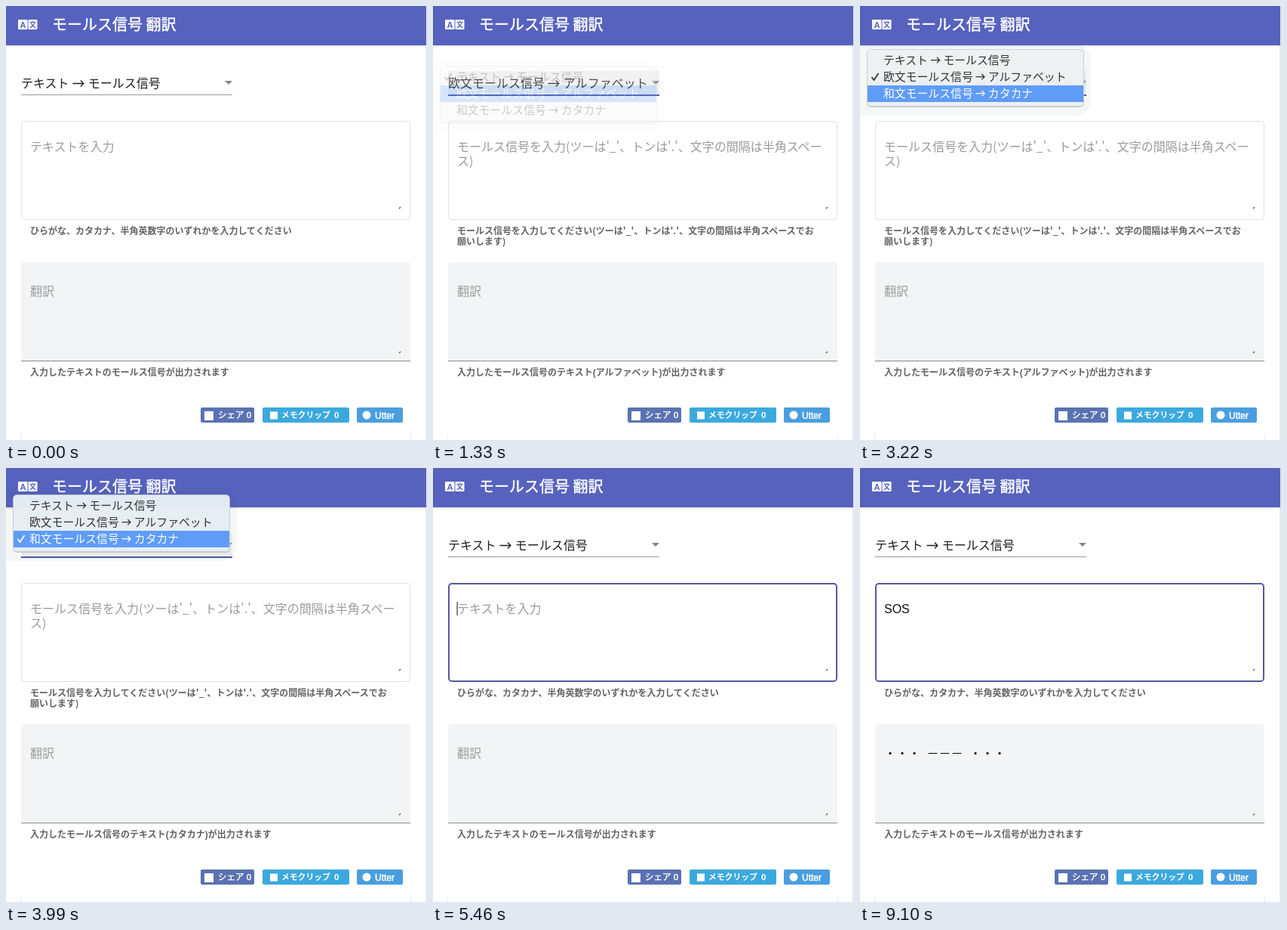
An HTML page for the animation above (9170 ms loop, 558 by 574 pixels).

```html
<!DOCTYPE html>
<html lang="ja">
<head>
<meta charset="utf-8">
<title>モールス信号 翻訳</title>
<style>
  html, body { margin: 0; width: 100%; height: 100%; overflow: hidden; background: #fff; }
  svg { display: block; width: 558px; height: 574px; }
  text { font-family: "Liberation Sans", "Noto Sans CJK JP", "Noto Sans CJK", sans-serif; white-space: pre; }
  .cjk text { font-family: "Noto Sans CJK JP", "Noto Sans CJK", sans-serif; }
</style>
</head>
<body>
<svg id="stage" viewBox="0 0 558 574" xmlns="http://www.w3.org/2000/svg"></svg>
<script>
const LOOP = 9170, STEP = 70;
const PRIMARY = '#5662bd', FOCUS = '#5658a2', MUTED = '#9b9b9b', HINT = '#646464';
const stage = document.getElementById('stage');

const MODES = [
  { head: 'テキスト', tail: 'モールス信号', result: '入力したテキストのモールス信号が出力されます' },
  { head: '欧文モールス信号', tail: 'アルファベット', result: '入力したモールス信号のテキスト(アルファベット)が出力されます' },
  { head: '和文モールス信号', tail: 'カタカナ', result: '入力したモールス信号のテキスト(カタカナ)が出力されます' }
];
const TEXT_PROMPT = ['テキストを入力'];
const MORSE_PROMPT = ["モールス信号を入力(ツーは'_'、トンは'.'、文字の間隔は半角スペー", 'ス)'];
const TEXT_HINT = ['ひらがな、カタカナ、半角英数字のいずれかを入力してください'];
const MORSE_HINT = ["モールス信号を入力してください(ツーは'_'、トンは'.'、文字の間隔は半角スペースでお", '願いします)'];

// hover: [time, row]
const MENUS = [
  { open: 140, pick: 1050, close: 1400, from: 0, hover: [[140, 0], [560, 1]] },
  { open: 2170, pick: 3150, close: 3570, from: 1, hover: [[2170, 1], [2660, 2]] },
  { open: 3780, pick: 4760, close: 5040, from: 2, hover: [[3780, 2], [4340, 1], [4620, 0]] }
];
const MODE_STEPS = [[0, 0], [1260, 1], [3360, 2], [4900, 0]];
const INPUT_STEPS = [[0, ''], [5950, 'S'], [7000, 'SO'], [7280, 'SOS']];
const OUTPUT_STEPS = [[0, []], [6440, ['・・・']], [7770, ['・・・', '－－－', '・・・']]];
const FOCUS_STEPS = [[0, ''], [140, 'select'], [5390, 'input']];
const CARET_STEPS = [[0, 0], [5390, 1], [5880, 0], [5950, 1], [6510, 0], [7000, 1], [7840, 0], [8330, 1], [8890, 0]];

const at = (steps, t) => steps.filter(([time]) => time <= t).pop()[1];

const rect = (x, y, w, h, fill, extra = '') =>
  `<rect x="${x}" y="${y}" width="${w}" height="${h}" fill="${fill}" ${extra}/>`;
const path = (d, extra) => `<path d="${d}" ${extra}/>`;
// y is the visual middle of the line; weight 500 is regular with a thin outline
const text = (s, x, y, size, fill, weight = 400) =>
  `<text x="${x}" y="${y + size * 0.38}" font-size="${size}" fill="${fill}" ` +
  (weight === 500 ? `stroke="${fill}" stroke-width=".45"` : `font-weight="${weight}"`) + `>${s}</text>`;
const cjk = content => `<g class="cjk">${content}</g>`;
const lines = (list, x, y, size, gap, fill, weight) =>
  cjk(list.map((s, i) => text(s, x, y + i * gap, size, fill, weight)).join(''));

function modeLabel({ head, tail }, x, y, size, gap, fill) {
  const end = x + head.length * size;
  const left = end + gap * 0.18, right = end + gap * 0.76, wing = size * 0.25;
  return text(head, x, y, size, fill) + text(tail, end + gap, y, size, fill) +
    path(`M${left} ${y + 0.5}H${right}m${-wing} ${-wing}l${wing} ${wing}l${-wing} ${wing}`,
      `fill="none" stroke="${fill}" stroke-width="1.3"`);
}

function header() {
  return rect(556, 0, 2, 574, '#e9e9ee') +
    rect(0, 52, 556, 3, 'url(#drop)') + rect(0, 0, 557, 52, PRIMARY) +
    rect(16, 18, 12.5, 13, '#fff', 'rx="1"') + rect(29.5, 18, 12, 13, '#fff', 'rx="1"') +
    text('A', 18.6, 24.6, 11, PRIMARY, 700) + text('文', 31, 24.5, 9, PRIMARY, 700) +
    cjk(text('モールス信号 翻訳', 61, 24.5, 20, '#fff', 500));
}

function selectBox(mode, focused) {
  return (focused ? rect(20, 86, 280, 31, '#000', 'opacity=".05"') : '') +
    modeLabel(MODES[mode], 20, 102, 16, 24.8, '#1c1c1c') +
    path('M290 99h10l-5 5z', 'fill="#858585"') +
    (focused ? rect(20, 117, 280, 2, '#4a58b0') : rect(20, 117, 280, 1, '#999'));
}

const grip = y => path(`M521 ${y + 1}l2-2`, 'stroke="#555" stroke-width="1.2"');

function inputBox(mode, value, focused, caret) {
  const border = focused
    ? rect(21, 153, 514, 129, '#fff', `rx="4" stroke="${FOCUS}" stroke-width="2"`)
    : rect(20.5, 152.5, 515, 130, '#fff', 'rx="4" stroke="#e0e0e0"');
  const width = [...value].reduce((sum, c) => sum + (c === 'O' ? 12.45 : 10.67), 0);
  return border + grip(267) +
    (value ? text(value, 32, 186, 16, '#111') : lines(mode ? MORSE_PROMPT : TEXT_PROMPT, 32, 186, 16, 18.5, MUTED)) +
    (caret ? rect(31.6 + width, 177, 1, 18, '#111') : '') +
    lines(mode ? MORSE_HINT : TEXT_HINT, 32, 297, 12, 14.5, HINT, 700);
}

function outputBox(mode, morse) {
  return path('M20 469V343q0-4 4-4H532q4 0 4 4V469z', 'fill="#f3f4f6"') +
    rect(20, 469, 516, 1, '#8c8c8c') + grip(458) +
    (morse.length ? morse.map((s, i) => text(s, 32 + i * 56.5, 377, 16, '#111')).join('')
                  : text('翻訳', 32, 377, 16, MUTED)) +
    text(MODES[mode].result, 32, 484, 12, HINT, 700);
}

function shareBar() {
  const button = (x, w, fill) => rect(x, 531, w, 20, fill, 'rx="2"');
  return button(258, 71, '#5a72b2') + rect(263, 536, 12, 12, '#fff') +
    text('シェア 0', 281, 541, 11.5, '#fff', 500) +
    button(340, 115, '#3ca9de') + rect(350, 536.5, 10, 10, '#fff') +
    text('メモクリップ', 365, 541, 10.8, '#fff', 700) + text('0', 435, 541, 11.5, '#fff', 700) +
    button(465, 61, '#4a9ee0') + '<circle cx="478" cy="541" r="5.5" fill="#fff"/>' +
    text('Utter', 489, 541, 12, '#fff', 500) +
    rect(19, 566, 1, 8, '#ececec') + rect(536, 566, 1, 8, '#ececec');
}

function popup(t) {
  const menu = MENUS.find(m => t >= m.open && t < m.close);
  if (!menu) return '';
  const top = 79 - 22 * menu.from;
  const fadeStart = menu.pick + 140;
  const alpha = t < fadeStart ? 1 : 1 - (t - fadeStart + STEP) / (menu.close - fadeStart + STEP);
  const blinkOff = t >= menu.pick && t < menu.pick + STEP;
  const active = blinkOff ? -1 : at(menu.hover, t);
  const fresh = t < menu.open + 420;
  const rows = MODES.map((mode, i) => {
    const y = top + 4 + 22 * i, on = i === active, ink = on ? '#fff' : '#303236';
    return (on ? rect(10, y, 286, 22, '#5f9cf8') : '') +
      modeLabel(mode, 31, y + 10.2, 14.85, 20, ink) +
      (i === menu.from ? path(`M15.5 ${y + 11}l3 4l6-9`, `fill="none" stroke="${ink}" stroke-width="1.8"`) : '');
  }).join('');
  return `<g opacity="${alpha}">` +
    rect(-20, top - 6, 326, 94, '#244', 'rx="20" opacity=".045"') +
    rect(9, top + 1, 288, 76, '#000', 'rx="6" opacity=".16"') +
    rect(9.5, top + 0.5, 287, 75, fresh ? '#e8f0f6' : '#f0f2f3', 'rx="5" fill-opacity=".97" stroke="#c4c9ce" stroke-width=".8"') +
    rows + '</g>';
}

const DEFS = '<defs><linearGradient id="drop" x2="0" y2="1"><stop stop-color="#000" stop-opacity=".12"/>' +
  '<stop offset="1" stop-color="#000" stop-opacity="0"/></linearGradient></defs>';

function draw(t) {
  const mode = at(MODE_STEPS, t), focus = at(FOCUS_STEPS, t);
  stage.innerHTML = DEFS + rect(0, 0, 558, 574, '#fff') + header() +
    selectBox(mode, focus === 'select') +
    inputBox(mode, at(INPUT_STEPS, t), focus === 'input', at(CARET_STEPS, t)) +
    outputBox(mode, at(OUTPUT_STEPS, t)) + shareBar() + popup(t);
}

const start = performance.now();
let shown = -1;
function tick() {
  const t = Math.floor(((performance.now() - start) % LOOP) / STEP) * STEP;
  if (t !== shown) draw(shown = t);
  requestAnimationFrame(tick);
}
tick();
</script>
</body>
</html>
```
